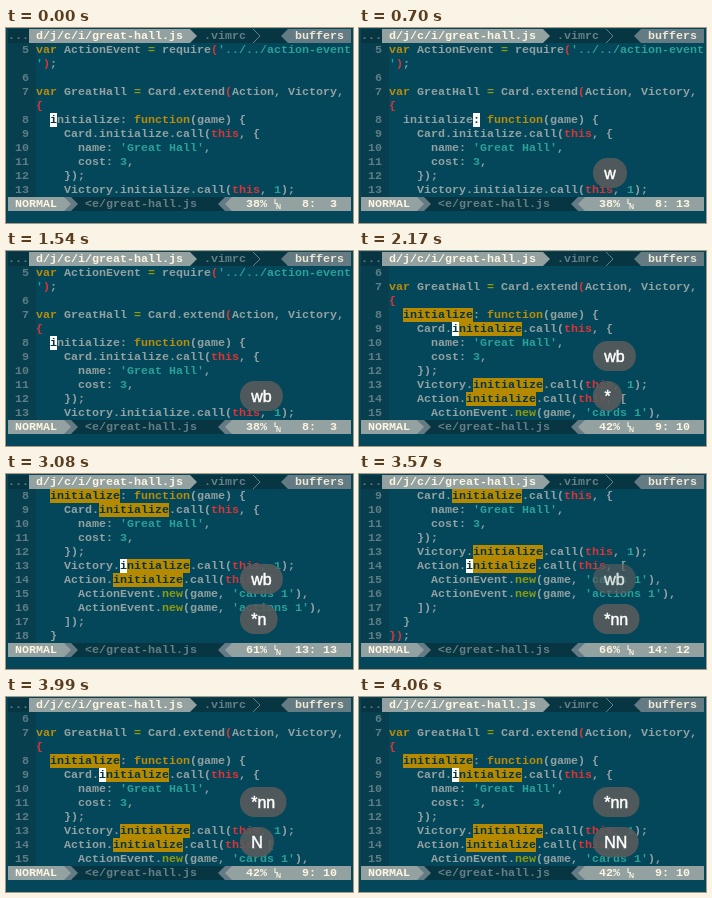
Animation, 347 px wide and 195 px high, one loop 5.18 s. Source, as an HTML page with a canvas:

```html
<!DOCTYPE html>
<html lang="en">
<head>
<meta charset="utf-8">
<title>Vim search motions</title>
<style>
html, body { margin: 0; width: 100%; height: 100%; overflow: hidden; background: #05475a; }
canvas { display: block; width: 347px; height: 195px; }
</style>
</head>
<body>
<canvas id="stage" width="347" height="195"></canvas>
<script>
const ctx = document.getElementById('stage').getContext('2d');
const LOOP = 5180, CELL_W = 7, CELL_H = 14, LEFT = 2, TOP = 1;
const COLS = 49, CODE_COLS = 45, GUTTER = 4, CODE_ROWS = 11, FIRST_LINE = 5, LINE_TOTAL = 21;
const C = {
  bg: '#05475a', gutter: '#073f4f', number: '#5f7d85', text: '#93a1a1',
  keyword: '#b98c0a', string: '#2aa198', red: '#dc3435', green: '#919c0c',
  match: '#b58900', ink: '#073642', chip: '#93a1a1', mid: '#657b83', bar: '#073642',
  dim: '#657f87', cream: '#fdf6e3', white: '#ffffff'
};

const source = [
  "var ActionEvent = require('../../action-event');",
  "",
  "var GreatHall = Card.extend(Action, Victory, {",
  "  initialize: function(game) {",
  "    Card.initialize.call(this, {",
  "      name: 'Great Hall',",
  "      cost: 3,",
  "    });",
  "    Victory.initialize.call(this, 1);",
  "    Action.initialize.call(this, [",
  "      ActionEvent.new(game, 'cards 1'),",
  "      ActionEvent.new(game, 'actions 1'),",
  "    ]);",
  "  }",
  "});"
];

const rules = [
  [/'[^']*'|\b\d+\b/g, { color: C.string }],
  [/\b(var|function)\b/g, { color: C.keyword }],
  [/\bthis\b/g, { color: C.red }],
  [/\bnew\b|=/g, { color: C.green }],
  [/(?<=^var .*)[(){]|^\}\)/g, { color: C.red }],
  [/initialize/g, { match: true }]
];

// One style per character, so that wrapped lines keep their colours.
const lines = source.map(text => {
  const cells = [...text].map(char => ({ char, color: C.text, match: false }));
  for (const [regex, style] of rules) {
    for (const hit of text.matchAll(regex)) {
      cells.slice(hit.index, hit.index + hit[0].length).forEach(cell => Object.assign(cell, style));
    }
  }
  return cells;
});

// Start time, first visible line, cursor line and column, key bubbles.
const states = [
  [0, 5, 8, 3, []],
  [700, 5, 8, 13, ['w']],
  [1470, 5, 8, 3, ['w']],
  [1540, 5, 8, 3, ['wb']],
  [2170, 6, 9, 10, ['wb', '*']],
  [3080, 8, 13, 13, ['wb', '*n']],
  [3290, 9, 14, 12, ['wb', '*nn']],
  [3780, 9, 14, 12, ['*nn']],
  [3850, 8, 13, 13, ['*nn', 'N']],
  [3990, 6, 9, 10, ['*nn', 'N']],
  [4060, 6, 9, 10, ['*nn', 'NN']]
];
const SEARCH_AT = 2170, FADE_AT = 3570, FLASH_AT = 3780, FLASH_END = 3850, STEP = 70;

const colX = col => LEFT + col * CELL_W;
const rowY = row => TOP + row * CELL_H;

function block(col, row, count, color) {
  ctx.fillStyle = color;
  ctx.fillRect(colX(col), rowY(row), count * CELL_W, CELL_H);
}

function write(text, col, row, color) {
  ctx.font = 'bold 11.667px "Liberation Mono", monospace';
  ctx.textAlign = 'left';
  ctx.fillStyle = color;
  ctx.fillText(text, colX(col), rowY(row) + 10);
}

function tracePoint(col, row, pointsLeft) {
  const tip = colX(pointsLeft ? col : col + 1), base = colX(pointsLeft ? col + 1 : col);
  const y = rowY(row);
  ctx.beginPath();
  ctx.moveTo(base, y);
  ctx.lineTo(tip, y + CELL_H / 2);
  ctx.lineTo(base, y + CELL_H);
}

function arrow(col, row, color, pointsLeft = false) {
  tracePoint(col, row, pointsLeft);
  ctx.fillStyle = color;
  ctx.fill();
}

function chevron(col, row, color) {
  tracePoint(col, row, false);
  ctx.strokeStyle = color;
  ctx.lineWidth = 1;
  ctx.stroke();
}

function drawTabs() {
  block(0, 0, COLS, C.bar);
  write('...', 0, 0, C.dim);
  block(3, 0, 23, C.chip);
  write('d/j/c/i/great-hall.js', 4, 0, C.cream);
  arrow(26, 0, C.chip);
  write('.vimrc', 28, 0, C.dim);
  chevron(35, 0, C.dim);
  arrow(39, 0, C.mid, true);
  block(40, 0, 9, C.mid);
  write('buffers', 41, 0, '#eee8d5');
}

function drawStatus(line, column) {
  const row = 12;
  block(0, row, COLS, C.bar);
  block(0, row, 8, C.chip);
  write('NORMAL', 1, row, C.cream);
  block(8, row, 1, C.mid);
  arrow(8, row, C.chip);
  arrow(9, row, C.mid);
  write('<e/great-hall.js', 11, row, C.dim);
  arrow(30, row, C.mid, true);
  block(31, row, 1, C.mid);
  arrow(31, row, C.chip, true);
  block(32, row, 17, C.chip);
  write(Math.floor(100 * line / LINE_TOTAL) + '%', 34, row, C.cream);
  write(String(line).padStart(4) + ':' + String(column).padStart(3), 39, row, C.cream);
  ctx.font = 'bold 7px "Liberation Sans", sans-serif';
  ctx.fillText('L', colX(38), rowY(row) + 7);
  ctx.fillText('N', colX(38) + 2, rowY(row) + 12);
}

function drawCode(first, cursorLine, cursorColumn, searching) {
  let row = 1;
  for (let number = first; row <= CODE_ROWS; number++) {
    const cells = lines[number - FIRST_LINE];
    const wrapped = Math.max(1, Math.ceil(cells.length / CODE_COLS));
    for (let part = 0; part < wrapped && row <= CODE_ROWS; part++, row++) {
      block(0, row, GUTTER, C.gutter);
      if (!part) write(String(number).padStart(3), 0, row, C.number);
      cells.slice(part * CODE_COLS, (part + 1) * CODE_COLS).forEach((cell, i) => {
        const atCursor = number === cursorLine && part * CODE_COLS + i === cursorColumn - 1;
        const found = searching && cell.match;
        if (atCursor || found) block(GUTTER + i, row, 1, atCursor ? C.white : C.match);
        write(cell.char, GUTTER + i, row, atCursor || found ? C.ink : cell.color);
      });
    }
  }
}

function drawBubble(text, centerY, alpha) {
  ctx.save();
  ctx.globalAlpha = alpha;
  ctx.font = '16px "Liberation Sans", sans-serif';
  ctx.textAlign = 'center';
  const width = Math.max(29, ctx.measureText(text).width + 22.4);
  ctx.fillStyle = 'rgba(88, 91, 92, 0.9)';
  ctx.beginPath();
  ctx.roundRect(234, centerY - 15, width, 30, 14.5);
  ctx.fill();
  ctx.fillStyle = ctx.strokeStyle = C.white;
  ctx.lineWidth = 0.5;
  ctx.fillText(text, 234 + width / 2, centerY + 6);
  ctx.strokeText(text, 234 + width / 2, centerY + 6);
  ctx.restore();
}

function draw(time) {
  const [, first, line, column, keys] = states.findLast(state => state[0] <= time);
  ctx.fillStyle = C.bg;
  ctx.fillRect(0, 0, 347, 195);
  drawTabs();
  drawCode(first, line, column, time >= SEARCH_AT);
  drawStatus(line, column);

  const fading = time >= FADE_AT && time < FLASH_AT;
  const fade = fading ? 1 - (Math.floor((time - FADE_AT) / STEP) + 1) / 4 : 1;
  keys.forEach((text, i) => {
    const last = i === keys.length - 1;
    drawBubble(text, last ? 145 : 105, last ? 1 : fade);
  });
  if (time >= FLASH_AT && time < FLASH_END) {
    ctx.fillStyle = C.white;
    ctx.fillRect(234, 0, 113, 20);
  }
}

const start = performance.now();
function tick() {
  draw((performance.now() - start) % LOOP);
  requestAnimationFrame(tick);
}
tick();
</script>
</body>
</html>
```
